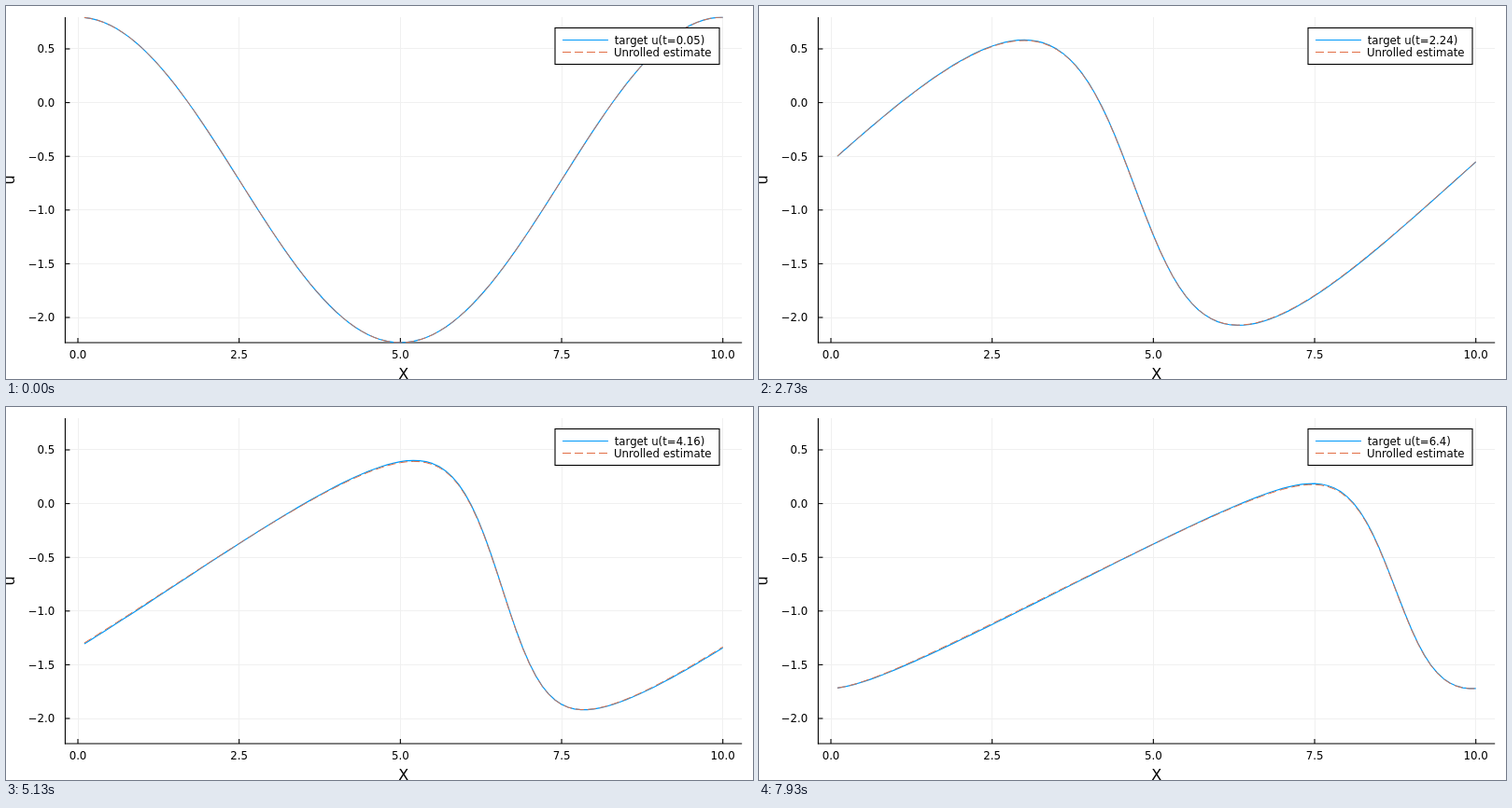
Write an HTML page with a canvas that moves like this. It is 800 px wide and 400 px high and loops after 8 s.

```html
<!DOCTYPE html>
<html lang="en">
<head>
<meta charset="utf-8">
<title>Burgers equation: unrolled estimate</title>
<style>
html, body { margin: 0; width: 100%; height: 100%; overflow: hidden; background: #fff; }
canvas { display: block; width: 800px; height: 400px; }
</style>
</head>
<body>
<canvas id="plot" width="800" height="400"></canvas>
<script>
const ctx = document.getElementById('plot').getContext('2d');
const BLUE = '#009afa', ORANGE = '#e26f46';
const LOOP = 8000, STEPS = 120, DT = 4 / 75;
const N = 100, H = 0.1, NU = 0.1, K = Math.PI / 5;
const MEAN = -0.72, AMP = 1.5147;
const LEFT = 63.4, RIGHT = 788.2, TOP = 12, BOTTOM = 361;

const px = x => 77 + 69.07 * x;
const py = u => 103.6 - 115.2 * u;

// Viscous Burgers equation on a periodic grid, upwind advection.
function rate(v) {
  return v.map((c, i) => {
    const l = v[(i + N - 1) % N], r = v[(i + 1) % N];
    return -c * (c - l) / H + NU * (l - 2 * c + r) / (H * H);
  });
}

function rk4(v, dt) {
  const add = (d, s) => v.map((c, i) => c + s * d[i]);
  const a = rate(v);
  const b = rate(add(a, dt / 2));
  const c = rate(add(b, dt / 2));
  const d = rate(add(c, dt));
  return v.map((u, i) => u + dt / 6 * (a[i] + 2 * b[i] + 2 * c[i] + d[i]));
}

function solve() {
  const sub = 8, states = [];
  let v = Array.from({ length: N }, (_, i) => 1 + 0.5 * Math.cos(K * H * (i + 1)));
  for (let n = 0; n < STEPS; n++) {
    states.push(v.map(c => MEAN + (c - 1) * AMP / 0.5));
    for (let s = 0; s < sub; s++) v = rk4(v, DT / sub);
  }
  return states;
}

// The estimate lags slightly at the crest and leads on the ramp.
function estimate(u, t) {
  const crest = u.indexOf(Math.max(...u));
  const err = 0.009 * Math.min(1, t / 4);
  return u.map((c, i) => c - err * Math.cos(K * H * (i - crest)));
}

const states = solve();

function line(x1, y1, x2, y2, color, width, dash = []) {
  ctx.strokeStyle = color;
  ctx.lineWidth = width;
  ctx.setLineDash(dash);
  ctx.beginPath();
  ctx.moveTo(x1, y1);
  ctx.lineTo(x2, y2);
  ctx.stroke();
}

function curve(u, color, width, dash = []) {
  ctx.strokeStyle = color;
  ctx.lineWidth = width;
  ctx.lineJoin = 'round';
  ctx.setLineDash(dash);
  ctx.beginPath();
  u.forEach((c, i) => ctx.lineTo(px(H * (i + 1)), py(c)));
  ctx.stroke();
}

function text(str, x, y, align = 'left', size = 11.75) {
  ctx.font = size + 'px "DejaVu Sans", sans-serif';
  ctx.textAlign = align;
  ctx.fillStyle = '#000';
  ctx.fillText(str, x, y);
}

const xTicks = [0, 2.5, 5, 7.5, 10];
const yTicks = [0.5, 0, -0.5, -1, -1.5, -2];
const snap = v => Math.floor(v) + 0.5;

function drawAxes() {
  for (const x of xTicks) line(snap(px(x)), TOP, snap(px(x)), BOTTOM, '#f0f0f0', 1);
  for (const y of yTicks) line(LEFT, snap(py(y)), RIGHT, snap(py(y)), '#f0f0f0', 1);
  line(LEFT - 0.5, BOTTOM, RIGHT, BOTTOM, '#000', 1.1);
  line(LEFT, TOP, LEFT, BOTTOM + 0.5, '#000', 1.1);
  for (const x of xTicks) {
    line(px(x), BOTTOM, px(x), BOTTOM - 5, '#000', 1.1);
    text(x.toFixed(1), px(x), 378, 'center');
  }
  for (const y of yTicks) {
    line(LEFT, py(y), LEFT + 5, py(y), '#000', 1.1);
    text(y.toFixed(1).replace('-', '\u2212'), 52.3, py(y) + 4.3, 'right');
  }
  text('X', 425.8, 400, 'center', 16);
  ctx.save();
  ctx.translate(8.7, 186.5);
  ctx.rotate(-Math.PI / 2);
  text('u', 0, 0, 'center', 16);
  ctx.restore();
}

function drawLegend(t) {
  const r = Math.round(t * 100) / 100;
  const label = Number.isInteger(r) ? r.toFixed(1) : String(r);
  ctx.fillStyle = '#fff';
  ctx.fillRect(588, 23.5, 176, 39);
  ctx.strokeStyle = '#000';
  ctx.lineWidth = 1.1;
  ctx.setLineDash([]);
  ctx.strokeRect(588, 23.5, 176, 39);
  line(596, 36.5, 645, 36.5, BLUE, 1.2);
  line(596, 49.5, 645, 49.5, ORANGE, 1, [9, 4]);
  text(`target u(t=${label})`, 651.7, 41);
  text('Unrolled estimate', 651, 54);
}

function draw(n) {
  const t = (n + 1) * DT;
  ctx.fillStyle = '#fff';
  ctx.fillRect(0, 0, 800, 400);
  drawAxes();
  ctx.save();
  ctx.beginPath();
  ctx.rect(LEFT, TOP - 0.5, RIGHT - LEFT, BOTTOM - TOP + 1);
  ctx.clip();
  curve(states[n], BLUE, 1.2);
  curve(estimate(states[n], n * DT), ORANGE, 1, [9, 4]);
  ctx.restore();
  drawLegend(t);
}

// Step starts fall on whole hundredths of a second.
function tick() {
  const cs = Math.floor((performance.now() % LOOP) / 10);
  draw(Math.min(STEPS - 1, Math.floor((cs + 0.5) * STEPS * 10 / LOOP)));
  requestAnimationFrame(tick);
}
tick();
</script>
</body>
</html>
```
